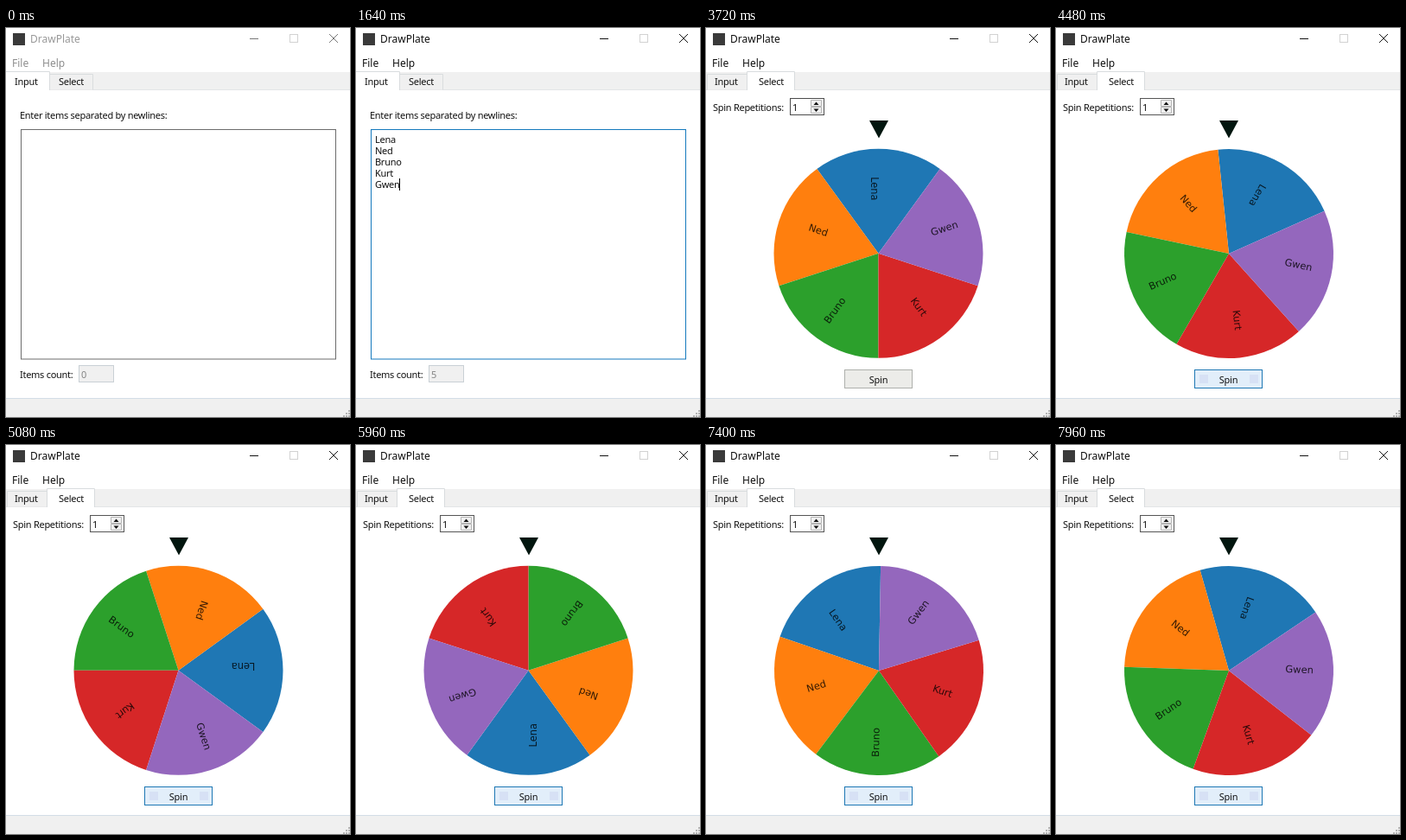
An HTML page that plays this animation: 398x450 px, repeating every 8000 ms.

```html
<!DOCTYPE html>
<html lang="en">
<head>
<meta charset="utf-8">
<title>DrawPlate</title>
<style>
  html, body { margin: 0; width: 100%; height: 100%; overflow: hidden; background: #fff; }
  svg { display: block; width: 398px; height: 450px; }
  text { font: 11px "Noto Sans", "Open Sans", sans-serif; letter-spacing: -.28px; fill: #111; }
  .bar text { font-size: 12px; letter-spacing: 0; fill: inherit; }
  .wheel text { font: 11.4px "DejaVu Sans", sans-serif; letter-spacing: 0; fill: #000; fill-opacity: .8;
    text-anchor: middle; dominant-baseline: central; }
  .tab { stroke: #d9dcde; fill: #f0f0f0; }
  .line { fill: none; stroke: currentColor; }
  .on { fill: #fff; }
</style>
</head>
<body>
<svg viewBox="0 0 398 450">
  <rect width="398" height="450" fill="#fff"/>

  <g class="bar" id="bar">
    <rect x="8" y="6" width="14" height="14" fill="#3a3a3a"/>
    <text id="title" x="28" y="17">DrawPlate</text>
    <text x="7" y="45">File</text>
    <text x="42" y="45">Help</text>
    <path class="line" d="M282 12.5h10"/>
    <rect x="328.500" y="7.500" width="9" height="9" fill="none" stroke="#d2d2d2"/>
    <path class="line" d="M374 7l10 10M384 7l-10 10"/>
  </g>

  <rect y="51" width="398" height="20" fill="#f0f0f0"/>
  <path d="M0 71.500H398" stroke="#e3e5e7"/>
  <rect y="428" width="398" height="22" fill="#f0f0f0"/>
  <path d="M0 428.500H398" stroke="#d3dde6"/>
  <path d="M396 443h2M393 446h2M396 446h2M390 449h2M393 449h2M396 449h2" stroke="#b4b4b4" stroke-width="2"/>

  <g id="input">
    <path class="tab" id="hoverTab" d="M50.500 71.500V53.500H100.500V71.500"/>
    <path class="tab on" d="M-.5 72V50.500H50.500V72"/>
    <text x="10" y="66">Input</text>
    <text x="61" y="66">Select</text>
    <text x="16" y="105">Enter items separated by newlines:</text>
    <rect id="edit" x="17.500" y="117.500" width="364" height="265.500" fill="#fff"/>
    <g id="list"></g>
    <path id="caret" stroke="#000"/>
    <text x="16" y="405">Items count:</text>
    <rect x="84.500" y="390.500" width="40" height="19" fill="#f0f0f0" stroke="#c9d0d5"/>
    <text id="count" x="87" y="405" style="fill:#858585">0</text>
  </g>

  <g id="select">
    <path class="tab" d="M1.500 71.500V53.500H48.500V71.500"/>
    <path class="tab on" d="M47.500 72V50.500H102.500V72"/>
    <text x="10" y="66">Input</text>
    <text x="61" y="65.500">Select</text>
    <text x="8" y="96">Spin Repetitions:</text>
    <rect id="spinBox" x="97.500" y="81.500" width="39" height="19" fill="#fff"/>
    <text x="100" y="96">1</text>
    <path d="M121.500 83.500h12v7h-12zM121.500 91.500h12v7h-12z" fill="#f0f0f0" stroke="#b5b5b5"/>
    <path d="M124.500 89l3-3.500 3 3.500zM124.500 93.500l3 3.500 3-3.500z" fill="#111"/>
    <path d="M189 107H211L200 127.500z" fill="#02160f"/>
    <g class="wheel" id="wheel"></g>
    <rect id="button" x="160.500" y="395.500" width="78" height="21"/>
    <path id="glow" d="M166 401h10v10h-10zM224 401h10v10h-10z" fill="#d6e0f6"/>
    <text x="199.500" y="411" text-anchor="middle">Spin</text>
  </g>
</svg>

<script>
const LOOP = 8000, PASTE = 1640, SWITCH = 2760, SPIN = 4150, TICK = 50, STEP = 5;
const CX = 199.5, CY = 260.8, R = 121;

// name, colour, label offset from the hub, label tilt
const items = [
  ['Lena', '#1f77b4', -5, -75, 90],
  ['Ned', '#ff7f0e', -69.5, -27, 18],
  ['Bruno', '#2ca02c', -50.5, 65.8, -54],
  ['Kurt', '#d62728', 46.8, 61.7, 54],
  ['Gwen', '#9467bd', 76.2, -29.2, -18]
];

const $ = id => document.getElementById(id);
const clamp = x => Math.max(0, Math.min(1, x));
const ramp = (t, from, to) => clamp((t - from) / (to - from));
const within = (t, from, to) => t >= from && t < to;
const show = (id, on) => $(id).setAttribute('visibility', on ? 'visible' : 'hidden');
const set = (id, attrs) => { for (const k in attrs) $(id).setAttribute(k, attrs[k]); };
const mix = (a, b, p) => `rgb(${a.map((v, i) => Math.round(v + (b[i] - v) * p))})`;

function add(parent, tag, attrs, text = '') {
  const el = document.createElementNS('http://www.w3.org/2000/svg', tag);
  for (const k in attrs) el.setAttribute(k, attrs[k]);
  el.textContent = text;
  $(parent).append(el);
}

const rim = deg => {
  const a = deg * Math.PI / 180;
  return `${(R * Math.sin(a)).toFixed(2)} ${(-R * Math.cos(a)).toFixed(2)}`;
};

items.forEach(([name, fill], i) => {
  const mid = -72 * i;
  add('wheel', 'path', { fill, d: `M0 0L${rim(mid - 36)}A${R} ${R} 0 0 1 ${rim(mid + 36)}z` });
  add('list', 'text', { x: 22, y: 133 + 13 * i }, name);
});
items.forEach(([name, , x, y, tilt]) =>
  add('wheel', 'text', { transform: `translate(${x} ${y}) rotate(${tilt})` }, name));

function buttonLook(t) {
  if (within(t, 4080, 4200)) return ['#cce4f7', '#005499'];
  const p = ramp(t, 3740, 4040);
  return [mix([236, 236, 233], [226, 238, 250], p), mix([174, 176, 172], [30, 120, 180], p)];
}

function draw(t) {
  const active = t >= 560, pasted = t >= PASTE, second = t >= SWITCH;
  $('bar').style.color = active ? '#111' : '#777';
  $('bar').style.fill = active ? '#111' : '#8e8e8e';
  $('title').style.fill = active ? '#111' : '#999';
  show('input', !second);
  show('select', second);

  const focus = t >= 600 ? 1 : active ? .5 : 0;
  set('edit', { stroke: mix([108, 108, 108], [20, 121, 189], focus) });
  show('list', pasted && !second);
  $('count').textContent = pasted ? items.length : 0;
  const caretOn = within(t, 560, 1080) || within(t, PASTE, 2160) || within(t, 2680, SWITCH);
  show('caret', caretOn);
  set('caret', { d: pasted ? 'M50.5 174v14' : 'M22.5 121v14' });
  $('hoverTab').style.fill = mix([240, 240, 240], [216, 234, 249], ramp(t, 2560, 2680));

  const hover = ramp(t, 3200, 3400) * (1 - ramp(t, 3480, 3760));
  set('spinBox', { stroke: mix([85, 85, 85], [23, 23, 23], hover) });
  const [fill, stroke] = buttonLook(t);
  set('button', { fill, stroke });
  set('glow', { opacity: t >= 4200 ? .9 : 0 });

  const angle = STEP * Math.max(0, Math.floor((t - SPIN) / TICK));
  const nudge = angle % 90 ? .5 : 0;
  set('wheel', { transform: `translate(${CX + nudge} ${CY + nudge / 2}) rotate(${angle})` });
}

function frame() {
  draw(performance.now() % LOOP);
  requestAnimationFrame(frame);
}
frame();
</script>
</body>
</html>
```
